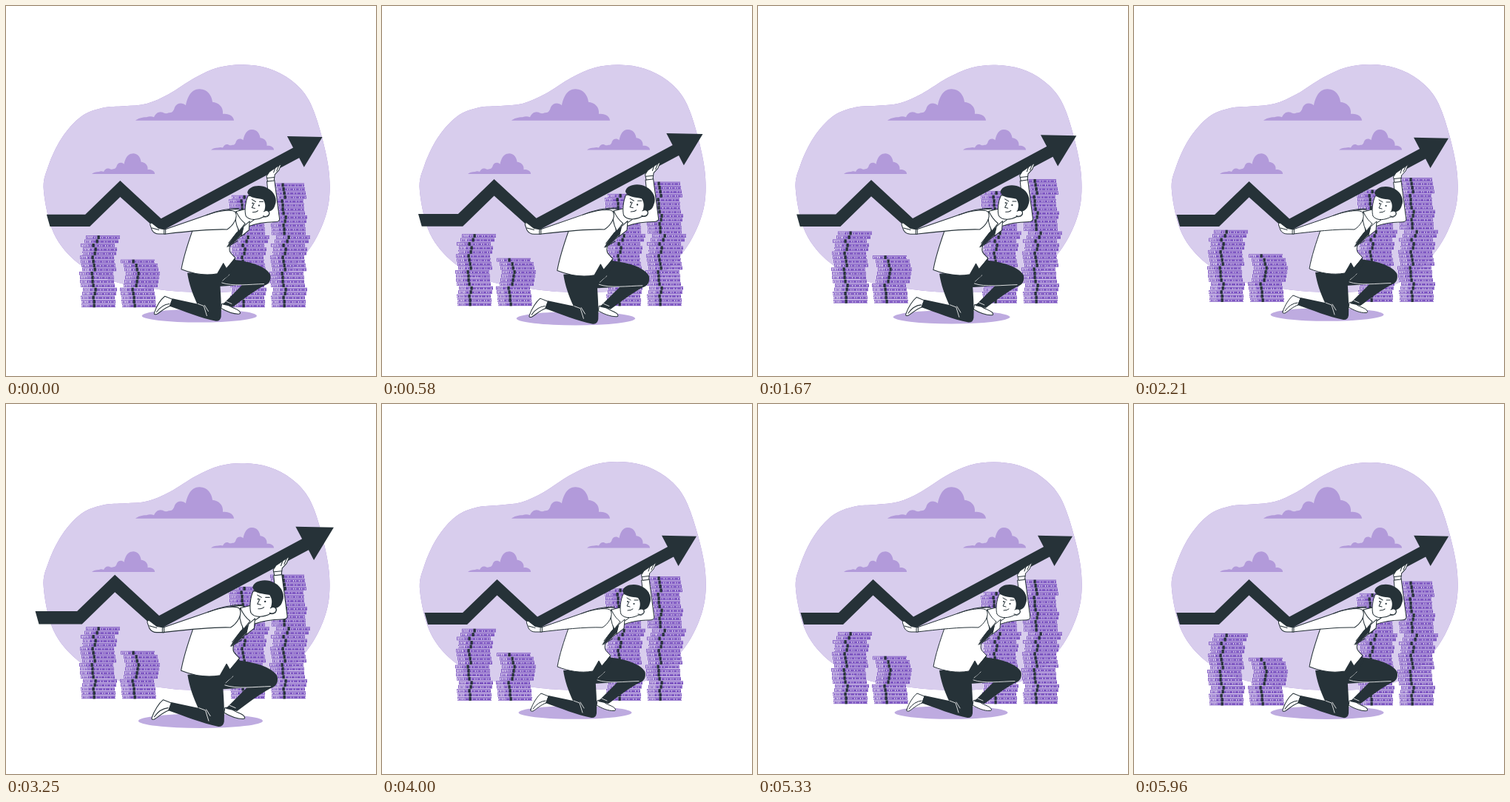
Write an HTML page that moves like this. It is 500 px wide and 500 px high and loops after 6 s.

```html
<!DOCTYPE html>
<html lang="en">
<head>
<meta charset="utf-8">
<title>Lifting the growth arrow</title>
<style>
  html, body { margin: 0; width: 100%; height: 100%; overflow: hidden; background: #fff; }
  svg { display: block; width: 100vw; height: 100vh; }
  .dark { fill: #263238; }
  .skin { fill: #fff; stroke: #263238; stroke-width: 1; stroke-linejoin: round; stroke-linecap: round; }
  .line { fill: none; stroke: #263238; stroke-width: 1; stroke-linecap: round; stroke-linejoin: round; }
  .fold { fill: none; stroke: #fff; stroke-width: 0.8; stroke-linecap: round; }
  .coin { fill: #7e57c2; }
  .tick { fill: none; stroke: #fff; stroke-opacity: 0.75; }
</style>
</head>
<body>
<svg viewBox="0 0 500 500" xmlns="http://www.w3.org/2000/svg">
  <defs>
    <path id="cloud" d="M0 0C3 -3 9 -4.5 15 -4.6C18 -6 22 -6 25 -4.6C27 -10 32 -13 37 -11
      C40 -9 42 -9.5 45 -10.5C50 -10 52 -14 53 -18C56 -24 63 -25 68 -20.5C70 -31 75 -42.5 86 -42.5
      C97 -43 103 -34 104 -25C112 -24 119 -19 118 -9C126 -10 133 -6 133 0Z"/>
  </defs>

  <g id="blob">
    <path class="coin"/>
    <path fill="#fff" fill-opacity="0.7"/>
  </g>

  <g fill="#b29ada">
    <use href="#cloud" transform="translate(175 154.8)"/>
    <use href="#cloud" transform="translate(277 194.6) scale(.64 .65)"/>
    <use href="#cloud" transform="translate(116 227) scale(.64 .65)"/>
  </g>

  <g id="coins"></g>

  <g id="lifter">
    <ellipse cx="261" cy="417" rx="76.5" ry="8.8" fill="#beabe0"/>
    <path class="dark" d="M57.5 282H109L155.5 237L210 287.5L386 193L378 177.8L425 178.8L400.5 219L394 206.5
      L208 305.5L155.5 258.5L115 298H62Z"/>

    <!-- front leg -->
    <path class="skin" d="M297 400C301 406 310 407 314 410.5Q317 414 314 414.5C305 415 297 411 290 407L291 401Z"/>
    <path class="dark" d="M304 342C325 344 349 350 355.5 362C357 370 354 375 347 377C334 384 322 393 306 405L292 402L318 376L286 378V356Z"/>
    <path class="fold" d="M291 373C305 378 328 375 347 374.5M304 401L297 398M292 370L301 362"/>

    <!-- kneeling leg -->
    <path class="skin" d="M201 413C204 404 210 395 215 391L225 395L222 404C215 406 208 413 204 415Q200 416 201 413Z"/>
    <path class="line" d="M204 412Q211 402 221 401"/>
    <path class="dark" d="M225 394L258 401C252 388 247 374 245 360L288 357C288 376 291 397 290 418Q289 424.5 283 424
      C263 420 241 411 221 404Z"/>
    <path class="fold" d="M259 401L267 404L271 417M268 403L273 411"/>

    <!-- raised arm -->
    <path class="skin" d="M351 238L361 236L367.8 288Q368 292 361 292C349 292 337 294 326 298L318 284L342 278L354 268Z"/>
    <path class="skin" d="M352 238L350.5 231L354 225.5L362 220L370.5 214.5L367 223L361.5 229L360.5 237Z"/>
    <path class="line" d="M351.5 233.5L361 232.5M362 220L360 226M367 217L364 224"/>

    <!-- torso -->
    <path class="skin" d="M252 303C246 320 240 338 237 355C252 361 268 364 285 361L293 347L297 354L309 340
      C304 334 299 333 302 323L316 311L327 296C327 284 319 275 309 275C288 276 264 290 252 303Z"/>
    <path class="dark" d="M285 362L293 347L297 355L308 340L311 347L299 364L290 371Z"/>
    <path class="dark" d="M297 326L306 312L313 303L321 297L325 300L317 309L307 319Z"/>
    <path class="skin" d="M310 278L322 275L334 289L321 298L313 304Z"/>
    <path class="skin" d="M310 278C314 287 318 291 322 294L314 304Q307 291 310 278Z"/>
    <path class="skin" d="M320 298L328 291L327 303L317 311Z"/>
    <path class="line" d="M299 325L312 317M300 320L311 306"/>

    <!-- supporting arm -->
    <path class="skin" d="M215 302C235 295 253 289 270 283C289 276 306 275 309 279C313 286 306 297 298 302
      C275 301 241 305 215 308Z"/>
    <path class="skin" d="M216 302L207 300.5L198 293.5Q195 292.5 195.5 296L198 303Q201 308 207 308H216Z"/>
    <path class="line" d="M214 301.5V308M198 300L207 302.5M270 283Q292 274 314 274"/>

    <!-- head -->
    <path class="skin" d="M326 257C322 265 321 278 323 284C328 291 340 289 347 285C355 287 357 277 350 276L350 258Z"/>
    <path class="dark" d="M325 253C326 244 342 241 352 247C362 252 365 263 362 269C360 277 355 279 347 279
      C349 273 350 268 346 262C338 260 328 261 325 253Z"/>
    <path class="skin" d="M347 278C352 275 356 279 353 283Q350 286 346 284"/>
    <path class="line" stroke-width="1.3" d="M331 262L336 265M341 265L346 265"/>
    <path class="line" d="M334 267L331 273L335 274M332 279Q337 279 339 277"/>
    <g class="dark"><circle cx="332" cy="267" r="1"/><circle cx="340.5" cy="270" r="1.1"/></g>
  </g>
</svg>

<script>
const LOOP = 6000;
const LEAD = 41.67;
const ROW = 5.43;
const GROUND = 408;
const part = id => document.getElementById(id);

// Closed smooth curve through a few points.
function smooth(points) {
  const at = i => points[(i + points.length) % points.length];
  let d = `M${points[0]}`;
  points.forEach((p, i) => {
    const before = at(i - 1), next = at(i + 1), after = at(i + 2);
    const a = [0, 1].map(k => p[k] + (next[k] - before[k]) / 6);
    const b = [0, 1].map(k => next[k] - (after[k] - p[k]) / 6);
    d += `C${a} ${b} ${next}`;
  });
  return d + 'Z';
}

const outline = smooth([
  [51, 250], [57, 217], [75, 179], [101, 150], [130, 138], [160, 135.5], [190, 132], [220, 119],
  [255, 97], [287, 83], [320, 79], [354, 84], [385, 100], [409, 127], [426, 174], [437, 230],
  [433, 280], [408, 331], [364, 371], [310, 385], [250, 386.5], [200, 382], [145, 372],
  [98, 348], [65, 308]
]);
for (const path of part('blob').children) path.setAttribute('d', outline);

const SWAY = [0, 0, -1, 1, 2, -1, -2, -2, -3, 1, 0, -1, -2, 1, 2, -1, 4, 6];
const BULGE = [1, 0, 0, -1, -2, 3, 4, 5, 6, 4, 3, -1];

function coinRow(x, y, seed) {
  const dash = seed % 2 ? '1 2 .8 4' : '.8 5 1 3';
  const right = x + 46;
  return `<rect class="coin" x="${x}" y="${y}" width="46" height="4.7"/>
    <path class="tick" stroke-width="2" stroke-dasharray="${dash}" stroke-dashoffset="${seed * 3}" d="M${x} ${y + 2.9}H${right}"/>
    <path class="tick" stroke-width=".5" d="M${x + 1} ${y + 1.2}H${right}"/>
    <path class="tick" stroke-width="3.6" stroke-dasharray=".8 1.5" d="M${x + 1.2} ${y + 2.4}h8"/>
    <rect class="dark" x="${x + 15.5}" y="${y}" width="3.2" height="4.9"/>`;
}

function stack(x, rows, shifts) {
  return Array.from({ length: rows }, (_, i) =>
    coinRow(x + shifts[i % shifts.length], GROUND - (i + 1) * ROW, i)).join('');
}

part('coins').innerHTML = stack(102, 18, SWAY) + stack(156, 12, BULGE)
  + stack(304, 28, SWAY) + stack(359, 31, SWAY);

// Linear interpolation through [position, value] stops.
function track(stops, p) {
  const i = stops.findIndex(stop => stop[0] >= p);
  if (i <= 0) return stops[0][1];
  const [p0, v0] = stops[i - 1], [p1, v1] = stops[i];
  return v0 + (v1 - v0) * (p - p0) / (p1 - p0);
}

const PULSE = [[0, 1], [.1, 1.1], [.3, 1], [.4, 1], [.5, 1.1], [.6, 1], [1, 1]];
const ROCK = [[0, 0], [.25, 1], [.75, -1], [1, 0]];
const FLOAT = [[0, 0], [.5, -10], [1, 0]];
const phase = (t, period) => t % period / period;

function render(t) {
  part('blob').setAttribute('transform', `rotate(${track(ROCK, phase(t, 1500))} 244 233)`);
  part('coins').setAttribute('transform', `translate(0 ${track(FLOAT, phase(t, LOOP))})`);
  const scale = track(PULSE, phase(t, 3000));
  part('lifter').setAttribute('transform', `translate(241.3 302) scale(${scale}) translate(-241.3 -302)`);
}

const start = performance.now();
function tick() {
  render((performance.now() - start + LEAD) % LOOP);
  requestAnimationFrame(tick);
}
tick();
</script>
</body>
</html>
```
